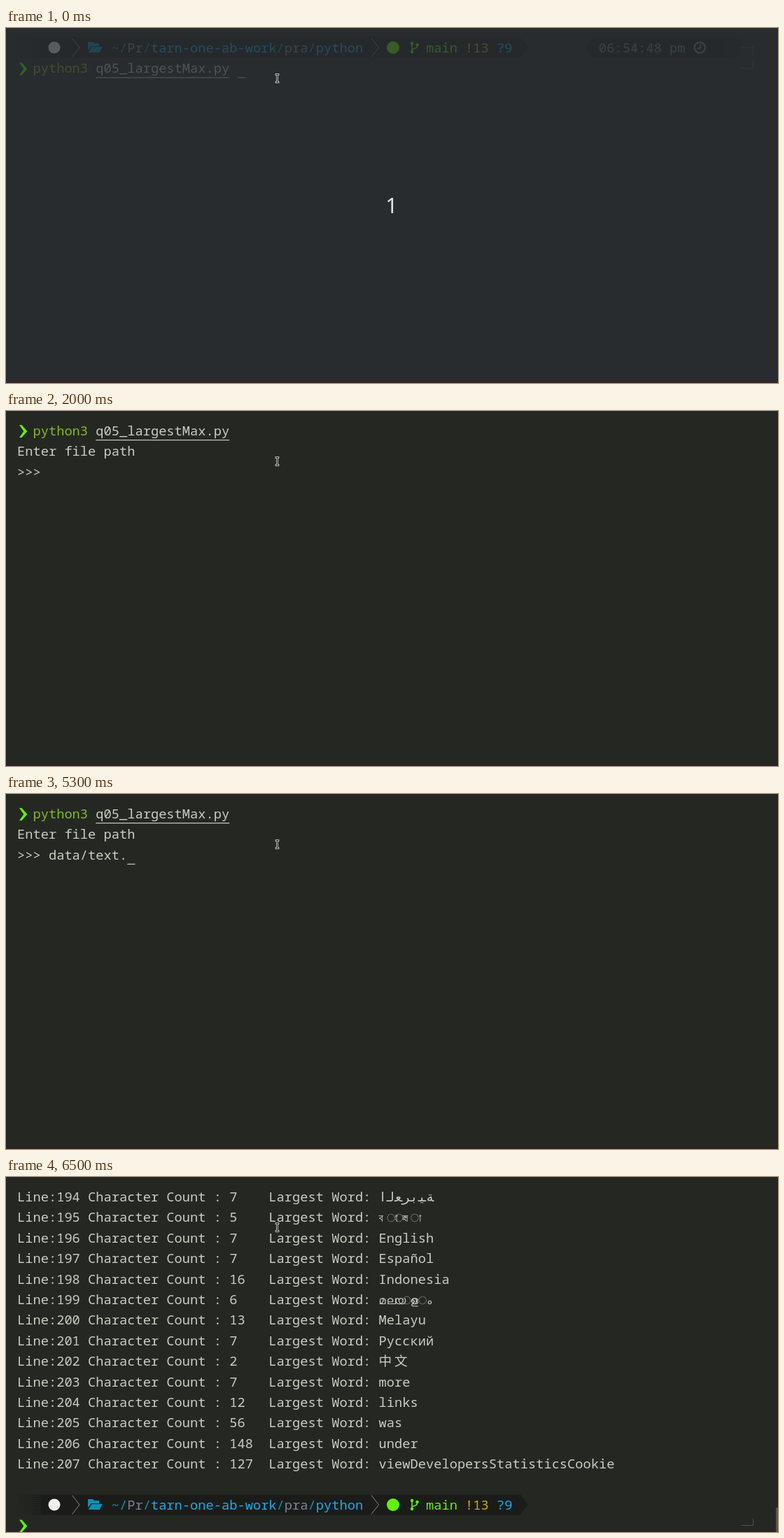
Animation of 1103 by 508 pixels, one loop 8000 ms. Source, as an HTML page with a canvas:

```html
<!DOCTYPE html>
<html lang="en">
<head>
<meta charset="utf-8">
<title>Terminal session</title>
<style>
  html, body { margin: 0; width: 100%; height: 100%; overflow: hidden; background: #252822; }
  canvas { display: block; }
</style>
</head>
<body>
<canvas id="stage" width="1103" height="508"></canvas>
<script>
const ctx = document.getElementById('stage').getContext('2d');
const LOOP = 8000, LEFT = 16, CELL = 11.23, ROW = 29.4;
const FG = '#cbccc3', GREEN = '#60f408', BAR = '#1b1c1a', TEAL = '#0e8fb4', BLUE = '#1eabeb';
const FAMILY = '"Noto Sans Mono", "DejaVu Sans Mono", "Noto Sans CJK SC", monospace';

const colX = col => LEFT + col * CELL;
const baseline = row => 34.9 + row * ROW;

function rect(x, y, w, h, color) {
  ctx.fillStyle = color;
  ctx.fillRect(x, y, w, h);
}

function poly(color, ...points) {
  ctx.fillStyle = color;
  ctx.beginPath();
  points.forEach(([x, y]) => ctx.lineTo(x, y));
  ctx.fill();
}

function line(color, width, ...points) {
  ctx.strokeStyle = color;
  ctx.lineWidth = width;
  ctx.beginPath();
  points.forEach(([x, y]) => ctx.lineTo(x, y));
  ctx.stroke();
}

function disc(x, y, r, color) {
  ctx.fillStyle = color;
  ctx.beginPath();
  ctx.arc(x, y, r, 0, 7);
  ctx.fill();
}

// Terminal text: each character sits in its own cell, CJK takes two.
function write(row, col, text, color = FG) {
  ctx.fillStyle = color;
  for (const ch of text) {
    const indic = /[\u0900-\u0dff]/.test(ch), wide = /[\u4e00-\u9fff]/.test(ch);
    ctx.font = `${indic ? 16 : 18.72}px ${FAMILY}`;
    ctx.fillText(ch, colX(col), baseline(row));
    col += wide ? 2 : 1;
  }
}

function underline(row, from, to) {
  rect(colX(from), baseline(row) + 6.1, (to - from) * CELL, 1.2, FG);
}

function chevron(row) {
  const y = 29.1 + row * ROW;
  poly(GREEN, [19, y - 9], [22.5, y - 9], [30.3, y], [22.5, y + 9], [19, y + 9], [25.3, y]);
}

// Striped bar end that grows denser towards the bar.
function fade(col, y, shades) {
  shades.forEach((shade, i) => {
    ctx.globalAlpha = shade;
    for (let s = 0; s < 29; s += 3) rect(colX(col + i), y + s, CELL, 2, BAR);
    ctx.globalAlpha = 1;
  });
}

function leftPrompt(row) {
  const y = 13.5 + row * ROW, mid = y + 14.5;
  fade(0, y, [.25, .5, .8]);
  rect(colX(3), y, colX(64) - colX(3), 29, BAR);
  poly(BAR, [colX(64), y], [746, mid], [colX(64), y + 29]);
  for (const x of [94.5, 522]) line('#6c6c6c', 1.2, [x, y + 1], [x + 10.5, mid], [x, y + 28]);

  disc(69, mid, 8.5, '#f0f0f0');
  poly(TEAL, [117, mid + 4], [117, mid - 8], [124, mid - 8], [126, mid - 6], [133, mid - 6],
    [133, mid - 2], [122, mid - 2]);
  poly(TEAL, [122.5, mid - 1], [138, mid - 1], [133.5, mid + 7], [117.5, mid + 7]);

  let col = 12;
  const path = [['~/', TEAL], ['Pr', '#7c8299'], ['/', TEAL], ['tarn-one-ab-work', BLUE],
    ['/', TEAL], ['pra', '#7c8299'], ['/', TEAL], ['python', BLUE]];
  for (const [part, color] of path) {
    write(row, col, part, color);
    col += part.length;
  }

  disc(553, mid, 9, GREEN);
  line(GREEN, 1.6, [580, mid - 6], [580, mid + 6]);
  line(GREEN, 1.6, [580, mid + 3], [587, mid], [587.5, mid - 4]);
  disc(580, mid - 6, 2.2, GREEN);
  disc(580, mid + 6, 2.2, GREEN);
  disc(587.5, mid - 4, 2.2, GREEN);
  write(row, 52, 'main', GREEN);
  write(row, 57, '!13', '#c9a811');
  write(row, 61, '?9', BLUE);
}

function rightPrompt() {
  const y = 13.5, mid = 28, color = '#5f8787';
  poly(BAR, [838, y], [828, mid], [838, y + 29]);
  rect(838, y, colX(90) - 838, 29, BAR);
  fade(90, y, [.7, .35]);
  write(0, 74, '06:54:48 pm', color);
  ctx.strokeStyle = color;
  ctx.lineWidth = 2.2;
  ctx.beginPath();
  ctx.arc(991.3, mid, 7.6, 0, 7);
  ctx.stroke();
  line(color, 1.8, [992, mid - 5], [992, mid + 1], [987.5, mid + 1]);
  line('#50514c', 1, [1050, 27.5], [1067.5, 27.5], [1067.5, 39]);
}

function lowerCorner(y) {
  line('#50514c', 1, [1050, y], [1067.5, y], [1067.5, y - 10]);
}

function command(row) {
  chevron(row);
  write(row, 2, 'python3', '#84b82c');
  write(row, 10, 'q05_largestMax.py');
}

function report(first, entries) {
  entries.forEach(([count, word], row) => {
    const head = `Line:${first + row} `;
    write(row, 0, count
      ? `${head}Character Count : ${count}`.padEnd(32) + `Largest Word: ${word}`
      : head + 'Empty Line');
  });
}

const DS = '{\\displaystyle';
const middlePage = [
  [81, '{n}}}' + DS], [17, 'working'], [191, 'used'], [], [32, 'two'], [140, DS],
  [57, 'n=61*53=3233}' + DS], [94, DS], [85, '\\phi'], [61, DS], [41, 'e=17}' + DS],
  [149, '{\\phi'], [45, 'd=2753}' + DS], [80, ':' + DS], [], [268, '{n}}}' + DS]
];
const lastPage = [
  [7, '\ufe8d\ufedf\ufecc\ufeae\ufe91\ufef4\ufe94'], [5, 'বাংলা'], [7, 'English'], [7, 'Español'],
  [16, 'Indonesia'], [6, 'മലയാളം'], [13, 'Melayu'], [7, 'Русский'], [2, '中文'], [7, 'more'],
  [12, 'links'], [56, 'was'], [148, 'under'], [127, 'viewDevelopersStatisticsCookie']
];

const TYPED = 'data/text.txt';
// The first two letters appear together.
const keyTimes = [2400, 2400, 2600, 2800, 3400, 3900, 4000, 4400, 4700, 5300, 5400, 5700, 6000];

function commandScreen(t) {
  leftPrompt(0);
  rightPrompt();
  lowerCorner(57.5);
  command(1);
  underline(1, 10, t < 1200 ? 27 : 28);
  if (t < 1200) underline(1, 28, 29);
}

function inputScreen(t) {
  command(0);
  underline(0, 10, 27);
  write(1, 0, 'Enter file path');
  const n = keyTimes.filter(k => k <= t).length;
  write(2, 0, '>>> ' + TYPED.slice(0, n));
  if (t < 2000 || n) underline(2, 4 + n, 5 + n);
}

function countdown() {
  rect(0, 0, 1103, 508, 'rgba(41,45,51,.76)');
  rect(0, 504, 1103, 4, '#33262b');
  ctx.fillStyle = '#e2e4e4';
  ctx.font = '30.5px "Noto Sans", sans-serif';
  ctx.textAlign = 'center';
  ctx.fillText('1', 551, 265);
  ctx.textAlign = 'left';
}

function pointer() {
  for (const [color, width] of [['#dcdcdc', 2.6], ['#20211d', 1]]) {
    const e = width / 2 - .5;
    line(color, width, [387.5, 66.5], [387.5, 77.5]);
    line(color, width, [385.5 - e, 66.5], [389.5 + e, 66.5]);
    line(color, width, [385.5 - e, 77.5], [389.5 + e, 77.5]);
  }
}

function draw(t) {
  rect(0, 0, 1103, 508, '#252822');
  rect(0, 504, 1103, 4, '#2a2326');
  if (t < 1300) {
    commandScreen(t);
  } else if (t < 6400) {
    inputScreen(t);
  } else if (t < 6500) {
    report(61, middlePage);
    rect(1100, 406, 3, 102, '#55564f');
  } else {
    report(194, lastPage);
    leftPrompt(15);
    chevron(16);
    lowerCorner(498.5);
    rect(1100, 473, 3, 35, '#55564f');
  }
  if (t < 200) countdown();
  pointer();
}

const start = performance.now();
(function tick() {
  draw((performance.now() - start) % LOOP);
  requestAnimationFrame(tick);
})();
</script>
</body>
</html>
```
